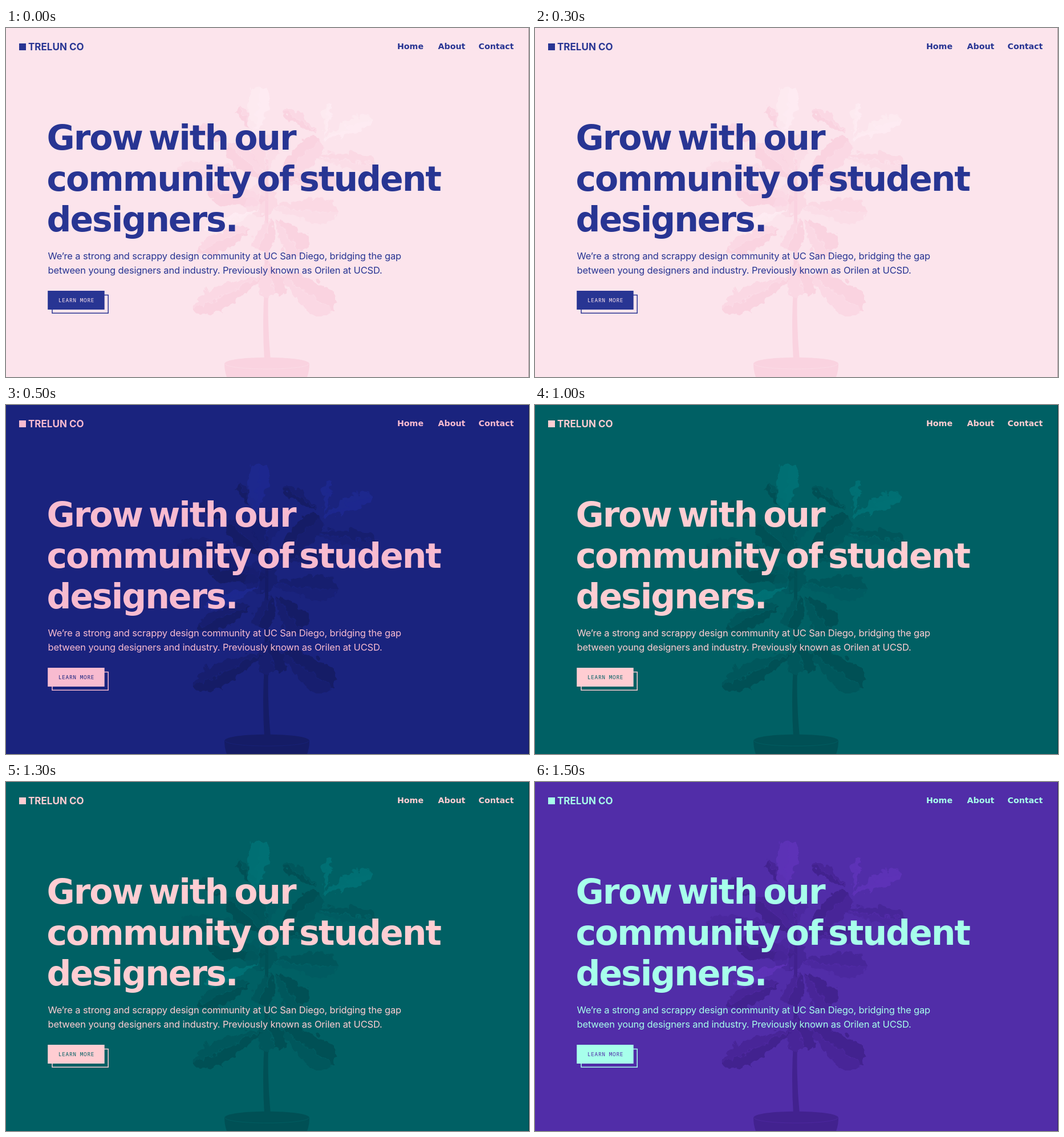
Recreate the animation shown at these times as an HTML page. Size 917x611 px, loop 2000 ms.

```html
<!DOCTYPE html>
<html lang="en">
<head>
<meta charset="utf-8">
<title>Student design community</title>
<style>
  html, body { margin: 0; height: 100%; overflow: hidden; background: var(--bg); }
  svg { display: block; width: 917px; height: 611px; background: var(--bg); font-family: Inter, sans-serif; fill: var(--ink); }
  .brand { font-size: 17px; font-weight: 700; }
  .nav, .title { font-family: "DejaVu Sans", sans-serif; font-weight: 700; }
  .nav { font-size: 14.2px; }
  .title { font-size: 60px; letter-spacing: -.034em; word-spacing: -.13em; }
  .lead { font-size: 16.5px; font-weight: 400; letter-spacing: -.01em; }
  .label { font: 9.5px "Noto Sans Mono", monospace; letter-spacing: .6px; fill: var(--bg); }
  .outline { fill: none; stroke: var(--ink); stroke-width: 1.5; }
  .dark { fill: var(--dark); }
  .mid { fill: var(--dark); opacity: .6; }
  .light { fill: var(--light); opacity: .8; }
  .shine { fill: var(--light); opacity: .2; }
  .vein { fill: none; stroke: var(--light); stroke-width: .8; opacity: .45; }
</style>
</head>
<body>
<svg viewBox="0 0 917 611">
  <filter id="ragged" color-interpolation-filters="sRGB">
    <feTurbulence baseFrequency=".05" numOctaves="2" seed="4"/>
    <feDisplacementMap in="SourceGraphic" scale="16" xChannelSelector="R" yChannelSelector="G"/>
  </filter>
  <path class="dark" d="M455 230 L460 230 L460 460 Q458 520 464 582 L453 582 Q449 520 453 460Z"/>
  <path class="dark" d="M383 588 C383 573 532 573 532 588 Q532 600 528 611 L387 611 Q383 600 383 588Z"/>
  <path class="vein" d="M384 588 C390 600 526 600 531 588"/>
  <g id="foliage" filter="url(#ragged)"></g>

  <rect x="23" y="27" width="12" height="12"/>
  <text class="brand" x="39" y="38.5">TRELUN CO</text>
  <g class="nav">
    <text x="686" y="37">Home</text>
    <text x="757.5" y="37">About</text>
    <text x="828.5" y="37">Contact</text>
  </g>
  <g class="title">
    <text x="71.5" y="212.5">Grow with our</text>
    <text x="71.5" y="284.5">community of student</text>
    <text x="71.5" y="355.5">designers.</text>
  </g>
  <g class="lead">
    <text x="73.5" y="404.5">We’re a strong and scrappy design community at UC San Diego, bridging the gap</text>
    <text x="73.5" y="429.5">between young designers and industry. Previously known as Orilen at UCSD.</text>
  </g>
  <rect class="outline" x="81" y="467.5" width="98.2" height="31.7"/>
  <rect x="73.2" y="460" width="99.5" height="33"/>
  <text class="label" x="92" y="480">LEARN MORE</text>
  <rect x="916" width="1" height="611" fill="#000" opacity=".35"/>
</svg>
<script>
const themes = [
  { bg: '#fce4ec', ink: '#283593', dark: '#fad3e0', light: '#fdecf2' },
  { bg: '#1a237e', ink: '#f8bbd0', dark: '#151c66', light: '#1e2a92' },
  { bg: '#006064', ink: '#ffcdd2', dark: '#005055', light: '#007477' },
  { bg: '#512da8', ink: '#a7ffeb', dark: '#42228f', light: '#6034ba' }
];

// Each leaf: tone, stem x/y, tip x/y, half width
const leaves = [
  ['dark', 440, 182, 402, 136, 9],
  ['light', 432, 186, 441, 98, 20],
  ['dark', 543, 178, 485, 140, 10],
  ['light', 556, 186, 562, 130, 8],
  ['light', 550, 192, 637, 154, 12],
  ['dark', 392, 200, 330, 168, 8],
  ['mid', 535, 218, 649, 236, 15],
  ['mid', 405, 240, 293, 246, 16],
  ['dark', 452, 262, 384, 200, 20],
  ['dark', 470, 270, 545, 190, 22],
  ['mid', 452, 250, 448, 186, 24],
  ['dark', 470, 262, 575, 262, 16],
  ['dark', 456, 300, 352, 280, 22],
  ['mid', 448, 255, 440, 325, 28],
  ['mid', 465, 310, 577, 318, 22],
  ['light', 440, 312, 350, 350, 9],
  ['dark', 432, 345, 334, 386, 17],
  ['dark', 462, 328, 440, 385, 18],
  ['dark', 468, 330, 516, 390, 23],
  ['dark', 452, 428, 328, 490, 21],
  ['dark', 480, 425, 568, 491, 28],
  ['dark', 455, 405, 468, 467, 25]
];

const foliage = document.getElementById('foliage');

function addPath(kind, d) {
  const path = document.createElementNS('http://www.w3.org/2000/svg', 'path');
  path.setAttribute('class', kind);
  path.setAttribute('d', d);
  foliage.append(path);
}

function addLeaf([tone, x, y, tipX, tipY, width]) {
  const dx = tipX - x, dy = tipY - y, length = Math.hypot(dx, dy);
  const at = (along, out) =>
    `${x + dx * along - dy / length * out * width} ${y + dy * along + dx / length * out * width}`;
  const side = `M${x} ${y} C${at(.3, .7)} ${at(.95, 1.8)} ${tipX} ${tipY}`;
  addPath(tone, `${side} C${at(.95, -1.8)} ${at(.3, -.7)} ${x} ${y}Z`);
  addPath('shine', side + 'Z');
  addPath('vein', `M${x} ${y} Q${at(.5, .15)} ${at(.94, 0)}`);
}

function draw() {
  const theme = themes[Math.floor(performance.now() / 500) % themes.length];
  for (const name in theme) document.documentElement.style.setProperty('--' + name, theme[name]);
  requestAnimationFrame(draw);
}

leaves.forEach(addLeaf);
draw();
</script>
</body>
</html>
```
